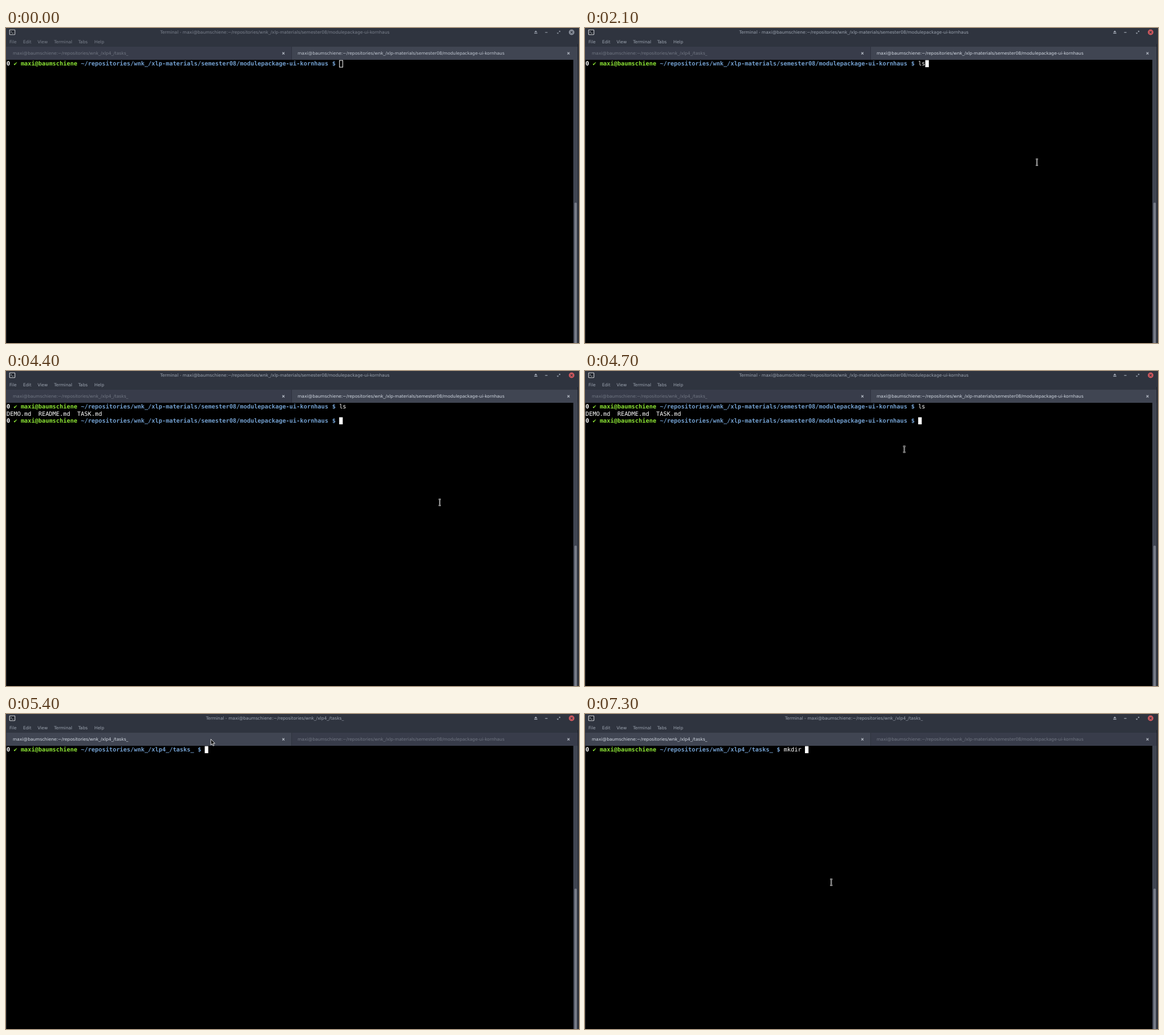
An HTML page that plays this animation: 1008 by 555 pixels, repeating every 8 s.

```html
<!DOCTYPE html>
<html lang="en">
<head>
<meta charset="utf-8">
<title>Terminal</title>
<style>
  html, body { margin: 0; width: 100%; height: 100%; overflow: hidden; background: #000; }
  svg { display: block; width: 100%; height: 100%; }
  text { white-space: pre; text-rendering: geometricPrecision; }
  .ui { font: 7.57px "DejaVu Sans", sans-serif; }
  .mono { font: 10.34px "DejaVu Sans Mono", monospace; fill: #fff; }
  .bold { font-weight: bold; }
</style>
</head>
<body>
<svg id="stage" viewBox="0 0 1008 555" xmlns="http://www.w3.org/2000/svg"></svg>
<script>
const NS = "http://www.w3.org/2000/svg";
const stage = document.getElementById("stage");
const LOOP = 8000, COL = 6.225, ROW = 12.45;
const GREEN = "#8ae234", BLUE = "#729fcf";
const USER = "maxi@baumschiene";
const PATHS = [
  "~/repositories/wnk_/xlp4_/tasks_",
  "~/repositories/wnk_/xlp-materials/semester08/modulepackage-ui-kornhaus"
];

function add(parent, tag, attrs, content) {
  const node = document.createElementNS(NS, tag);
  set(node, attrs);
  if (content) node.textContent = content;
  parent.append(node);
  return node;
}
function set(node, attrs) {
  for (const name in attrs) node.setAttribute(name, attrs[name]);
}
const group = (parent = stage) => add(parent, "g", {});
const rect = (x, y, width, height, fill, parent = stage) =>
  add(parent, "rect", { x, y, width, height, fill });
const line = (d, stroke, width = 1, parent = stage) =>
  add(parent, "path", { d, stroke, fill: "none", "stroke-width": width });
const label = (x, y, content, fill) => add(stage, "text", { class: "ui", x, y, fill }, content);
const show = (node, on) => set(node, { visibility: on ? "visible" : "hidden" });

function cell(parent, col, row, content, fill = "#fff", weight = "") {
  return add(parent, "text", {
    class: "mono " + weight, x: 1 + col * COL, y: 66.25 + row * ROW, style: `fill:${fill}`
  }, content);
}
// Draws a prompt and returns the column where typing starts.
function prompt(parent, row, path) {
  cell(parent, 0, row, "0", "#fff", "bold");
  cell(parent, 2, row, "✔", GREEN, "bold");
  cell(parent, 4, row, USER, GREEN, "bold");
  cell(parent, 21, row, path, BLUE, "bold");
  cell(parent, 22 + path.length, row, "$", BLUE, "bold");
  return 24 + path.length;
}

// Window frame
rect(0, 0, 1008, 555, "#000");
rect(0, 0, 1008, 56, "#2f343f");
rect(0, 33, 1008, 23, "#383c4a");
const icon = group();
add(icon, "rect", { x: 6.3, y: 3.3, width: 9.4, height: 8.4, rx: .6, fill: "#23272f", stroke: "#d5d8dc", "stroke-width": 1.1 });
line("M8.2 5.6l1.7 1.4l-1.7 1.4M10.6 9h2.4", "#d5d8dc", .8, icon);

const title = label(473, 9.8, "", "#8f97a4");
set(title, { "text-anchor": "middle" });
const menu = Object.entries({ File: 6, Edit: 30, View: 55.5, Terminal: 84.5, Tabs: 127, Help: 155.5 })
  .map(([name, x]) => label(x, 26.9, name, "#8f97a4"));

const buttons = group();
add(buttons, "path", { d: "M929.3 7.6L932 4.6L934.7 7.6ZM929.3 8.8h5.4v1.2h-5.4Z", fill: "#aab1bd" });
line("M948.4 7.8h4.2", "#aab1bd", 1.1, buttons);
line("M972.8 5.3h1.8v1.8M971.8 9.7H970V7.9M974.4 5.5l-1.6 1.6M970.2 9.5l1.6-1.6", "#aab1bd", .9, buttons);
const closer = add(stage, "circle", { cx: 995, cy: 7.5, r: 4.9 });
line("M993.2 5.7l3.6 3.6M996.8 5.7l-3.6 3.6", "#2f343f", 1.1);

// Tabs
const tabs = [[2, 500, 12, 488], [503, 502, 513, 989.5]].map(([x, width, textX, closeX], i) => {
  const back = rect(x, 33, width, 23, "#404552");
  const text = label(textX, 47.2, `${USER}:${PATHS[i]}`, "#d3dae3");
  line(`M${closeX - 1.9} 42.7l3.8 3.8m0-3.8l-3.8 3.8`, "#b6bcc6", 1.1);
  return { back, text };
});
rect(502, 33, 1, 23, "#2e323d");

// Scrollbar and window edges
rect(998, 56, 8, 499, "#404552");
add(stage, "rect", { x: 1000, y: 307.5, width: 4.2, height: 255, rx: 2.1, fill: "#767b87" });
rect(1006, 28, 1, 527, "#14161b");
rect(1007, 28, 1, 527, "#484c55");
rect(0, 56, .6, 499, "#484c55");

// Terminal pages
const pages = [group(), group()];
const startCol = pages.map((page, i) => prompt(page, 0, PATHS[i]));
const typed = pages.map((page, i) => cell(page, startCol[i], 0, ""));
const listing = group(pages[1]);
cell(listing, 0, 1, "DEMO.md  README.md  TASK.md");
prompt(listing, 2, PATHS[1]);
const caret = add(stage, "rect", { "stroke-width": 1 });

// Mouse pointers, drawn around their hot spots
const beam = group();
const beamPath = "M-2-5.3H2M0-5.3V5.3M-2 5.3H2";
line(beamPath, "#e4e4e4", 2.2, beam);
line(beamPath, "#1c1c1c", .8, beam);
const arrow = add(stage, "path", {
  d: "M0 0V10.4L2.4 8.2L4 12L5.7 11.2L4.1 7.6H7.3Z",
  fill: "#111", stroke: "#f0f0f0", "stroke-width": .9, "stroke-linejoin": "round"
});

const KEYS = { ls: [2000, 2100], "mkdir ": [6400, 6500, 6700, 6900, 7100, 7300] };
const typedAt = (word, t) => word.slice(0, KEYS[word].filter(time => t >= time).length);
const smooth = u => u * u * (3 - 2 * u);
const glide = (from, to, u) => from.map((v, i) => v + (to[i] - v) * smooth(Math.min(1, u)));

function pointerAt(t) {
  if (t < 300) return [793.6, 236.5];
  if (t < 1200) return [794, 236.5];
  if (t < 4400) return [795, 236.5];
  if (t < 5500) return glide([763, 231.5], [360.3, 44.2], (t - 4400) / 600);
  return glide([360.3, 44.2], [433.2, 296.5], (t - 5500) / 300);
}

function draw(now) {
  const t = Math.floor((now % LOOP) / 100) * 100;
  const focused = t >= 1000;
  const active = t < 5400 ? 1 : 0;
  const listed = active === 1 && t >= 2700;
  const [px, py] = pointerAt(t);
  const overTabs = py < 56;

  const chrome = focused ? "#9ca4b0" : "#7c828e";
  title.textContent = `Terminal - ${USER}:${PATHS[active]}`;
  [title, ...menu].forEach(node => set(node, { fill: chrome }));
  set(icon, { opacity: focused ? 1 : .9 });
  set(buttons, { opacity: focused ? 1 : .85 });
  set(closer, { fill: focused ? "#cc575d" : "#858b96" });

  tabs.forEach(({ back, text }, i) => {
    const current = i === active;
    const hovered = i === 0 && overTabs;
    show(back, current || hovered);
    set(back, { fill: current ? "#404552" : "#3c414e" });
    set(text, { fill: current ? (focused ? "#d3dae3" : "#c3cad4") : hovered ? "#a4abb7" : "#717783" });
  });

  pages.forEach((page, i) => set(page, { display: i === active ? "inline" : "none" }));
  const word = typedAt(active ? "ls" : "mkdir ", t);
  typed[active].textContent = word;
  show(listing, listed);

  const row = listed ? 2 : 0;
  const col = startCol[active] + (listed ? 0 : word.length);
  const inset = focused ? 0 : .5;
  set(caret, {
    x: 1 + col * COL + inset, y: 56.6 + row * ROW + inset,
    width: COL - inset, height: ROW - inset,
    fill: focused ? "#fff" : "none", stroke: focused ? "none" : "#fff"
  });

  const seen = t >= 200;
  show(beam, seen && !overTabs);
  show(arrow, seen && overTabs);
  set(overTabs ? arrow : beam, { transform: `translate(${px} ${py})` });
}

const begun = performance.now();
function tick() {
  draw(performance.now() - begun);
  requestAnimationFrame(tick);
}
tick();
</script>
</body>
</html>
```
